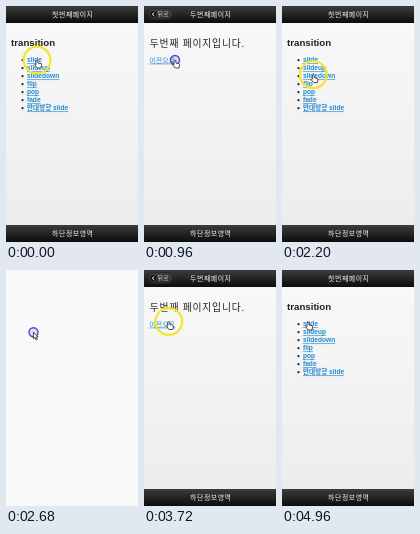
An HTML page for the animation above (5 s loop, 132x236 px).

```html
<!DOCTYPE html>
<html lang="ko">
<head>
<meta charset="utf-8">
<title>Page transitions</title>
<style>
html, body { margin: 0; width: 100%; height: 100%; overflow: hidden; background: #f9f9f9; }
svg { display: block; width: 100%; height: 100%; }
text { font-family: "Liberation Sans", "Noto Sans CJK KR", "Noto Sans CJK", sans-serif; font-weight: 700; }
.bar { font-size: 6.9px; fill: #f4f4f4; text-anchor: middle; }
.link { font-size: 6.6px; fill: #2489ce; text-decoration: underline; }
.head { fill: #222; }
.ko { font-weight: 500; letter-spacing: .08em; }
</style>
</head>
<body>
<svg id="stage" viewBox="0 0 132 236">
  <defs>
    <linearGradient id="paper" x2="0" y2="1"><stop stop-color="#f9f9f9"/><stop offset="1" stop-color="#ececec"/></linearGradient>
    <linearGradient id="dark" x2="0" y2="1"><stop stop-color="#3c3c3c"/><stop offset="1" stop-color="#0c0c0c"/></linearGradient>
    <linearGradient id="key" x2="0" y2="1"><stop stop-color="#444"/><stop offset="1" stop-color="#2a2a2a"/></linearGradient>
  </defs>
  <rect width="132" height="236" fill="#f9f9f9"/>
  <g id="first"></g>
  <g id="second"></g>
  <circle id="halo" r="13.4" fill="none" stroke="#f3e52e" stroke-width="2.2"/>
  <circle id="ring" stroke-width="1.4"/>
  <g id="pointer" fill="#fff" stroke="#222" stroke-width=".8" stroke-linejoin="round">
    <path id="hand" d="M-1 0.6Q0 -.4 .9 .6V3L4 3.7Q4.8 4 4.6 5.2L4 8H.2L-2.3 4.8Q-2 3.8 -1 4.6Z"/>
    <path id="arrow" d="M0 0V6.4L1.5 5.1L2.7 7.7L3.8 7.2L2.6 4.7H4.6Z"/>
  </g>
</svg>
<script>
const LOOP = 5000, STEP = 40, W = 132, H = 236;
const $ = id => document.getElementById(id);
const clamp = v => Math.max(0, Math.min(1, v));
const span = (t, start, length) => clamp((t - start) / length);
const mix = (a, b, k) => a + (b - a) * k;
const easeIn = p => p ** 1.75;
const easeOut = p => 1 - (1 - p) ** 1.75;

const label = (x, y, cls, str, size) =>
  `<text x="${x}" y="${y}" class="${cls}"${size ? ` font-size="${size}"` : ''}>${str}</text>`;

const page = (title, body) => `
  <rect width="${W}" height="${H}" fill="url(#paper)"/>
  <rect width="${W}" height="17" fill="url(#dark)"/>
  <rect y="219" width="${W}" height="17" fill="url(#dark)"/>
  ${label(66.8, 10.6, 'bar ko', title)}${label(66.8, 229.6, 'bar ko', '하단정보영역')}${body}`;

const items = ['slide', 'slideup', 'slidedown', 'flip', 'pop', 'fade', '반대방향 slide'];
$('first').innerHTML = page('첫번째페이지',
  label(5, 40, 'head', 'transition', 9.7) +
  items.map((s, i) => `<circle cx="16.5" cy="${54.2 + i * 8}" r="1.1" fill="#222"/>` +
    label(21, 56.4 + i * 8, 'link', s)).join(''));

$('second').innerHTML = page('두번째페이지',
  `<rect x="4" y="2.8" width="25" height="11" rx="5.5" fill="url(#key)" stroke="#1a1a1a" stroke-width=".6"/>
   <circle cx="9.3" cy="8.2" r="3.2" fill="#161616"/>
   <path d="M10.2 6.5L8.2 8.2L10.2 9.9" fill="none" stroke="#eee" stroke-width="1"/>` +
  `<text x="13.8" y="10.3" class="ko" font-size="5.6" fill="#ddd">뒤로</text>` +
  label(5.8, 40.6, 'head ko', '두번째 페이지입니다.', 9.8) +
  label(5.3, 56.6, 'link ko', '이전으로'));

// time, x, y of the pointer tip
const path = [
  [0, 31, 54], [1760, 31, 54], [2000, 28, 62],
  [2120, 28, 62], [2240, 33, 72], [2360, 33, 72], [2400, 27.5, 62.3], [3600, 27.5, 62.3],
  [3720, 24.8, 51.5], [4920, 24.8, 51.5], [4960, 26, 52], [5000, 31, 54]
];
// press, release, faded
const presses = [[120, 400, 640], [920, 1200, 1640], [2600, 2800, 3080], [4080, 4330, 4520]];
const hovers = [[0, 120], [1800, 2600], [3640, 4080]];
const arrows = [[2600, 3640], [4080, 4640]];
const within = (t, list) => list.some(([a, b]) => t >= a && t < b);

function pointerAt(t) {
  const i = path.findIndex(p => p[0] > t);
  const [a, b] = [path[i - 1], path[i]];
  const k = span(t, a[0], b[0] - a[0]);
  return [mix(a[1], b[1], k), mix(a[2], b[2], k)];
}

// [x, y, opacity] of both pages
function pagesAt(t) {
  if (t < 1160) return [
    [-W * easeIn(span(t, 240, 225)), 0, 1],
    [W * (1 - easeOut(span(t, 240, 350))), 0, 1]];
  if (t < 2560) return [
    [-W * (1 - easeOut(span(t, 1160, 350))), 0, 1],
    [W * easeIn(span(t, 1160, 225)), 0, 1]];
  if (t < 4200) return [
    [0, 0, 1 - span(t, 2570, 110)],
    [0, H * (1 - easeOut(span(t, 2710, 260))), 1]];
  return [
    [0, 0, span(t, 4605, 195)],
    [0, H * easeIn(span(t, 4295, 225)), 1]];
}

function place(el, [x, y, alpha]) {
  el.setAttribute('transform', `translate(${x.toFixed(2)} ${y.toFixed(2)})`);
  el.setAttribute('opacity', alpha);
}

function draw(t) {
  const [one, two] = pagesAt(t);
  place($('first'), one);
  place($('second'), two);

  const [x, y] = pointerAt(t);
  place($('pointer'), [x, y, 1]);
  const isArrow = within(t, arrows);
  $('arrow').setAttribute('opacity', +isArrow);
  $('hand').setAttribute('opacity', +!isArrow);
  place($('halo'), [x, y, +within(t, hovers)]);

  const press = presses.find(p => t >= p[0] && t < p[2]);
  const ring = $('ring');
  if (!press) return place(ring, [x, y, 0]);
  const k = span(t, press[1], press[2] - press[1]);
  const grey = Math.min(1, k * 1.4);
  const tone = [70, 70, 205].map(c => Math.round(mix(c, 150, grey)));
  place(ring, [x, y, 1 - k * k]);
  ring.setAttribute('r', mix(4.5, 7.2, k));
  ring.setAttribute('stroke', `rgb(${tone})`);
  ring.setAttribute('fill', `rgba(${tone},.15)`);
}

function tick() {
  draw(Math.floor((performance.now() - start) % LOOP / STEP) * STEP);
  requestAnimationFrame(tick);
}
const start = performance.now();
tick();
</script>
</body>
</html>
```
